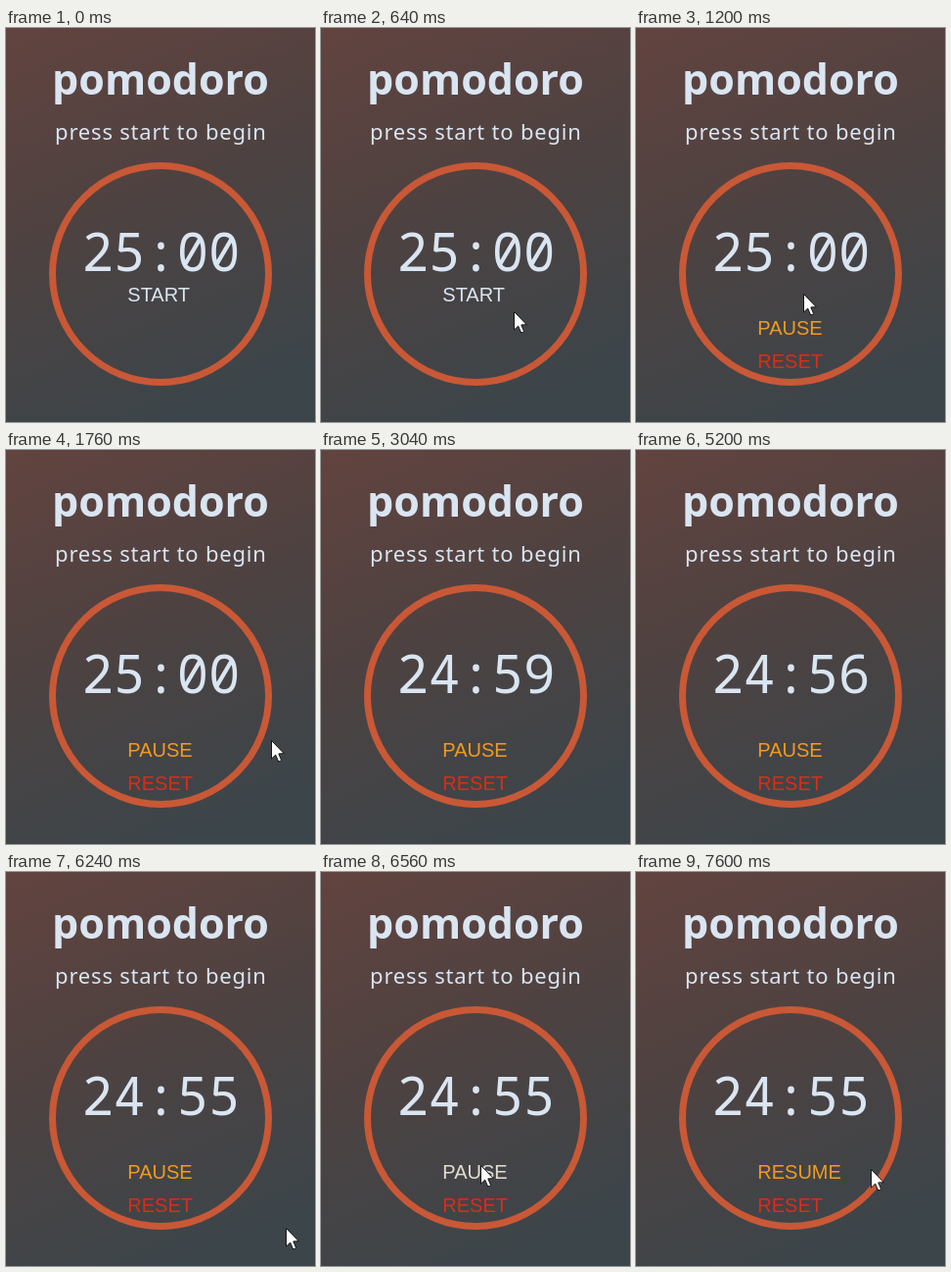
Recreate the animation shown at these times as an HTML page with a canvas. Size 316x402 px, loop 8000 ms.

```html
<!DOCTYPE html>
<html lang="en">
<head>
<meta charset="utf-8">
<title>pomodoro</title>
<style>
  html, body { margin: 0; width: 100%; height: 100%; overflow: hidden; background: #4b4241; }
  canvas { display: block; }
</style>
</head>
<body>
<canvas id="stage"></canvas>
<script>
const W = 316, H = 402, LOOP = 8000, STEP = 80;
const canvas = document.getElementById('stage');
const ctx = canvas.getContext('2d');
const scale = window.devicePixelRatio || 1;
canvas.width = W * scale;
canvas.height = H * scale;
canvas.style.width = W + 'px';
canvas.style.height = H + 'px';

const PALE = '#d9e5f1', ORANGE = '#f09a20', RED = '#dc2c18', HOVER = '#e2dcd0';
const SANS = '"Noto Sans", "Open Sans", sans-serif';
const MONO = '"Noto Sans Mono", "DejaVu Sans Mono", monospace';
const BUTTON = '20px "Liberation Sans", Arial, sans-serif';

// Moments at which the clock loses a second
const TICKS = [1840, 3120, 4160, 5200, 6240];

// Each visit of the pointer: [time, x, y] stops and the time it leaves
const VISITS = [
  { end: 1840, stops: [[240, 300, 347], [640, 197, 289], [960, 187, 276], [1120, 187, 276],
      [1200, 171, 271], [1360, 171, 271], [1440, 177, 291], [1520, 177, 291], [1760, 271, 296]] },
  { end: LOOP, stops: [[6240, 286, 363], [6560, 163, 299], [7520, 163, 299], [7600, 240, 303]] }
];

function pointerAt(t) {
  const visit = VISITS.find(v => t >= v.stops[0][0] && t < v.end);
  if (!visit) return null;
  const s = visit.stops;
  const i = s.findIndex(p => p[0] > t);
  if (i < 0) return s[s.length - 1].slice(1);
  const [t0, x0, y0] = s[i - 1], [t1, x1, y1] = s[i];
  const k = (t - t0) / (t1 - t0);
  return [x0 + (x1 - x0) * k, y0 + (y1 - y0) * k];
}

function clockAt(t) {
  const left = 1500 - TICKS.filter(tick => t >= tick).length;
  const two = n => String(n).padStart(2, '0');
  return two(Math.floor(left / 60)) + ':' + two(left % 60);
}

function text(str, x, y, font, color, align = 'center', spacing = 0) {
  ctx.font = font;
  ctx.fillStyle = color;
  ctx.textAlign = align;
  ctx.letterSpacing = spacing + 'px';
  ctx.fillText(str, x, y);
}

function backdrop() {
  const g = ctx.createLinearGradient(0, 0, 170, 402);
  g.addColorStop(0, '#62433f');
  g.addColorStop(0.5, '#4d4241');
  g.addColorStop(1, '#3c454a');
  ctx.fillStyle = g;
  ctx.fillRect(0, 0, W, H);
}

function ring() {
  ctx.beginPath();
  ctx.arc(158, 251, 110.5, 0, Math.PI * 2);
  ctx.lineWidth = 7;
  ctx.strokeStyle = '#c95836';
  ctx.stroke();
}

function pointer([x, y]) {
  const shape = [[0, 0], [0, 18.5], [4.2, 14.6], [7.2, 21.5], [10.2, 20.2], [7.3, 13.4], [12.8, 13.2]];
  ctx.beginPath();
  shape.forEach(([dx, dy]) => ctx.lineTo(x + 0.5 + dx, y + 0.5 + dy));
  ctx.closePath();
  ctx.fillStyle = '#fff';
  ctx.fill();
  ctx.lineWidth = 1;
  ctx.strokeStyle = '#151515';
  ctx.stroke();
}

function buttons(t) {
  if (t < 1200) {
    text('START', 124.3, 278.5, BUTTON, PALE, 'left');
    return;
  }
  const hover = t >= 6560 && t < 7600;
  text(t < 6880 ? 'PAUSE' : 'RESUME', 124.3, 313, BUTTON, hover ? HOVER : ORANGE, 'left');
  text('RESET', 124.3, 347, BUTTON, RED, 'left');
}

function draw(now) {
  const t = Math.floor((now % LOOP) / STEP) * STEP;
  ctx.setTransform(scale, 0, 0, scale, 0, 0);
  backdrop();
  text('pomodoro', 158, 68, 'bold 43px ' + SANS, PALE);
  text('press start to begin', 158.4, 114, '22px ' + SANS, PALE, 'center', 0.8);
  ring();
  text(clockAt(t), 158.5, 248, '54px ' + MONO, PALE);
  buttons(t);
  const p = pointerAt(t);
  if (p) pointer(p);
}

let start;
function frame(now) {
  if (start === undefined) start = now;
  draw(now - start);
  requestAnimationFrame(frame);
}
requestAnimationFrame(frame);
</script>
</body>
</html>
```
